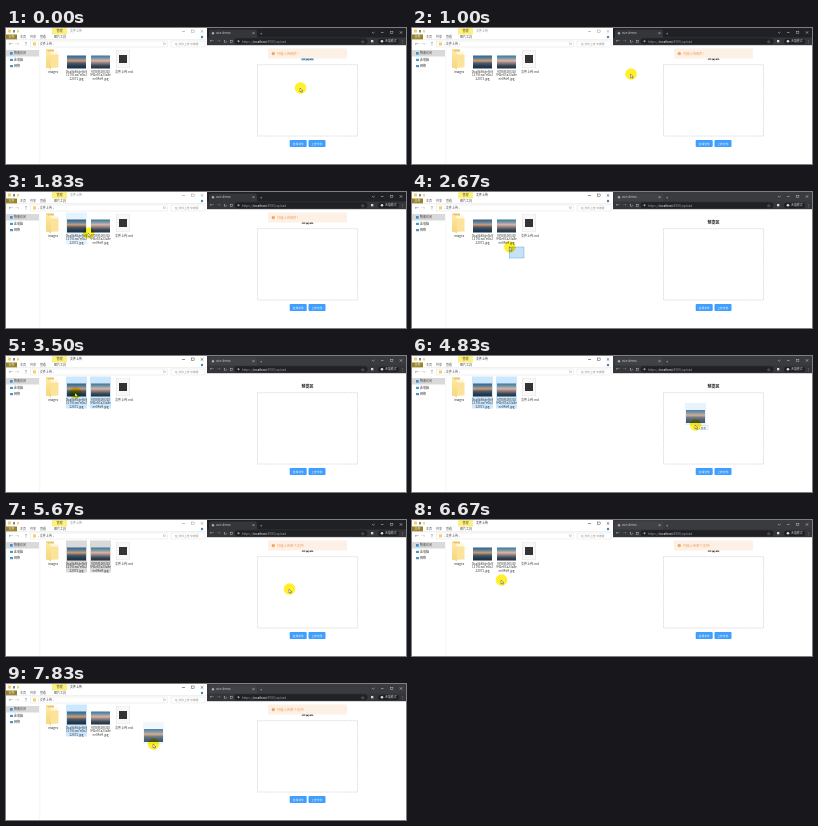
An HTML page with a canvas for the animation above (8000 ms loop, 400 px wide and 136 px high).

```html
<!DOCTYPE html>
<html lang="zh">
<head>
<meta charset="utf-8">
<title>拖拽上传</title>
<style>
html, body { margin: 0; width: 100%; height: 100%; overflow: hidden; background: #fff; }
canvas { display: block; width: 400px; height: 136px; }
</style>
</head>
<body>
<canvas id="stage"></canvas>
<script>
const canvas = document.getElementById('stage');
const g = canvas.getContext('2d');
const ratio = window.devicePixelRatio || 1;
canvas.width = 400 * ratio;
canvas.height = 136 * ratio;

const LOOP = 8000, STEPS = 48;
const FONT = '"Noto Sans CJK SC", "Noto Sans CJK", "Noto Sans", sans-serif';

// Pointer path: step, x, y
const PATH = [
  [0, 294, 60], [2, 285, 57], [5, 235, 48], [7, 202, 44],
  [9, 135, 47], [11, 82, 41], [13, 100, 57], [14, 112, 67],
  [15, 112, 66], [18, 68, 33], [19, 69, 37], [21, 69, 37],
  [24, 145, 46], [27, 256, 63], [29, 283, 69], [35, 283, 69],
  [37, 190, 65], [39, 89, 60], [40, 89, 60], [42, 71, 42],
  [45, 72, 43], [46, 100, 49], [47, 147, 60]
];

function pointer(step) {
  const i = PATH.findIndex(p => p[0] >= step);
  if (i <= 0) return { x: PATH[0][1], y: PATH[0][2] };
  const [a, ax, ay] = PATH[i - 1], [b, bx, by] = PATH[i];
  const u = (step - a) / (b - a);
  return { x: ax + (bx - ax) * u, y: ay + (by - ay) * u };
}

const within = (v, a, b) => v >= a && v < b;

function box(x, y, w, h, color) {
  g.fillStyle = color;
  g.fillRect(x, y, w, h);
}

function round(x, y, w, h, r, color) {
  g.fillStyle = color;
  g.beginPath();
  g.roundRect(x, y, w, h, r);
  g.fill();
}

function disc(x, y, r, color) {
  g.fillStyle = color;
  g.beginPath();
  g.arc(x, y, r, 0, Math.PI * 2);
  g.fill();
}

function line(points, color, width = 0.5) {
  g.strokeStyle = color;
  g.lineWidth = width;
  g.beginPath();
  points.forEach(([x, y], i) => i ? g.lineTo(x, y) : g.moveTo(x, y));
  g.stroke();
}

function frame(x, y, w, h, color, width = 0.5) {
  g.strokeStyle = color;
  g.lineWidth = width;
  g.strokeRect(x, y, w, h);
}

function text(s, x, y, size, color, align = 'left', weight = 400) {
  g.font = `${weight} ${size}px ${FONT}`;
  g.textAlign = align;
  g.textBaseline = 'middle';
  g.fillStyle = color;
  g.fillText(s, x, y);
}

function cross(x, y, r, color) {
  line([[x - r, y - r], [x + r, y + r]], color);
  line([[x + r, y - r], [x - r, y + r]], color);
}

function gradient(y, h, colors) {
  const fill = g.createLinearGradient(0, y, 0, y + h);
  colors.forEach((c, i) => fill.addColorStop(i / (colors.length - 1), c));
  return fill;
}

const SUNSET = ['#31608c', '#58809d', '#d29a70', '#4a5867', '#253c53', '#1d2e40'];
const COAST = ['#3b7595', '#7199aa', '#dfb3a2', '#85797d', '#344655', '#23313f'];

function photo(x, y, colors) {
  box(x, y, 19, 13, gradient(y, 13, colors));
}

function folder(x, y) {
  box(x, y, 8, 18, '#e8c565');
  box(x + 3, y + 2, 9, 16, '#fff7dd');
  g.fillStyle = gradient(y, 20, ['#ffe9a2', '#f7d578']);
  g.beginPath();
  g.moveTo(x, y);
  g.lineTo(x + 5, y + 4);
  g.lineTo(x + 5, y + 20);
  g.lineTo(x, y + 17);
  g.fill();
  box(x + 5, y + 5, 7.5, 13, '#fbe39b');
}

function label(rows, x) {
  rows.forEach((row, i) => text(row, x, 43.5 + i * 3.7, 3.1, '#333', 'center'));
}

function drawExplorer(step, active) {
  const ink = active ? '#222' : '#888';
  box(0, 0, 200, 136, '#fff');

  box(46, 0, 15, 6.5, '#fdf083');
  box(2, 1.5, 3, 3, '#f4cf63');
  box(7, 2, 2, 2.5, '#7d8791');
  box(11, 2, 2, 2.5, '#f1d578');
  text('管理', 53.5, 3.3, 3.1, '#554e20', 'center');
  text('文件上传', 64, 3.3, 3, ink);
  line([[176, 3.5], [179, 3.5]], ink);
  frame(185.5, 2, 2.6, 2.6, ink, 0.4);
  cross(196, 3.4, 1.3, ink);

  box(0, 6.5, 11, 5, '#9a8228');
  text('文件', 5.5, 9, 3, '#fff', 'center');
  text('主页', 17, 9, 3, '#444', 'center');
  text('共享', 27, 9, 3, '#444', 'center');
  text('查看', 37, 9, 3, '#444', 'center');
  text('图片工具', 54, 9, 3, '#444', 'center');
  disc(196, 9, 1.2, '#3c86c7');
  line([[0, 11.7], [200, 11.7]], '#ddd');

  text('←', 3, 16, 4, '#555');
  text('→', 9, 16, 4, '#aaa');
  text('↑', 18, 16, 4, '#555');
  frame(24.5, 13, 137, 6, '#ddd', 0.4);
  box(27, 14.4, 3, 3, '#f4cf63');
  text('› 文件上传 ›', 32, 16, 3.1, '#444');
  text('↻', 157, 16, 3.5, '#777');
  frame(165, 13, 34, 6, '#ddd', 0.4);
  text('在 文件上传 中搜索', 169, 16, 2.8, '#888');

  box(0, 22, 33, 6.5, '#d9d9d9');
  box(4, 24, 2.7, 2.7, '#3c91d4');
  text('快速访问', 8, 25.3, 3, '#333');
  box(4, 30.8, 3, 2.2, '#419bd2');
  text('此电脑', 8, 32, 3, '#333');
  box(4, 37, 3, 2.2, '#4d93bd');
  text('网络', 8, 38.2, 3, '#333');
  line([[33.8, 21], [33.8, 136]], '#eee');

  const both = within(step, 18, 39);
  const mark = active ? '#cce8ff' : '#d9d9d9';
  if (both || step >= 42) box(60, 20.5, 21, 32, mark);
  else if (within(step, 10, 13)) box(60, 20.5, 21, 32, '#e5f3ff');
  if (both || step === 17) box(84, 20.5, 21, 32, mark);

  folder(40, 21.5);
  label(['images'], 47);
  photo(61, 27.5, SUNSET);
  label(['0ba8b86de9b9', '11791ea7e0b2', '22071.jpg'], 70.5);
  photo(85, 27.5, COAST);
  label(['9788f51f0310', '942e87a23a8e', 'ee04d4.jpg'], 94.5);
  box(110, 22, 14, 18, '#e3e3e3');
  box(110.5, 22.3, 13, 17.3, '#f8f8f8');
  box(113, 27, 8, 8, '#333');
  label(['文件上传.md'], 118);
}

function drawMessage(step) {
  const first = step < 14;
  const alpha = step < 13 || step >= 33 ? 1 : step === 13 || step === 32 ? 0.5 : 0;
  if (!alpha) return;
  g.save();
  g.globalAlpha = alpha;
  g.translate(0, (alpha - 1) * 4);
  round(262, 20.5, 79, 10, 1, '#fdf0e4');
  disc(267.3, 25.6, 1.6, '#f09a4b');
  text('!', 267.3, 25.6, 2.6, '#fff', 'center', 700);
  text(first ? '只能上传图片!' : '只能上传单个文件!', 271, 25.6, 3.3, '#ef9b55');
  g.restore();
}

function button(x, s) {
  round(x, 112, 17, 7, 0.8, '#409eff');
  text(s, x + 8.5, 115.5, 2.8, '#fff', 'center');
}

function drawBrowser(step, active) {
  const light = '#d5d6d8';
  box(200, 0, 200, 136, '#fff');
  box(201, 0, 199, 10, active ? '#202124' : '#3a3b3e');
  round(203, 1.5, 48, 9, [2, 2, 0, 0], active ? '#35363a' : '#414246');
  disc(207, 5.2, 1.2, '#a9adb2');
  text('vue-demo', 210, 5.3, 3.1, light);
  cross(247.5, 5.2, 0.9, light);
  text('+', 255, 5.2, 4, light, 'center');
  line([[366, 4], [367.3, 5.2], [368.6, 4]], light);
  line([[375, 4.5], [377.5, 4.5]], light);
  frame(384.5, 3.3, 2.4, 2.4, light, 0.4);
  cross(395, 4.5, 1.2, light);

  box(201, 9.5, 199, 7.7, '#35363a');
  round(228.5, 10.3, 133, 6, 3, '#202124');
  text('←', 204, 13.2, 4, light);
  text('→', 210.5, 13.2, 4, '#85878a');
  text('↻', 217.5, 13.2, 4, light);
  frame(224.2, 12.3, 2.2, 2.2, light, 0.4);
  disc(232.5, 13.3, 1, '#a4a7ab');
  text('https://', 236, 13.3, 3.2, '#9aa0a6');
  const start = 236 + g.measureText('https://').width;
  text('localhost', start, 13.3, 3.2, '#fff');
  const rest = start + g.measureText('localhost').width;
  text(':8080/upload', rest, 13.3, 3.2, '#9aa0a6');
  text('☆', 355, 13.3, 3.5, light);
  box(365, 12, 2.3, 2.3, light);
  round(372, 10.7, 21, 5.3, 2.6, '#202124');
  disc(376, 13.3, 1.3, light);
  text('无痕模式', 379, 13.3, 2.9, light);
  text('⋮', 396.5, 13.3, 4, light, 'center');

  if (step < 3) box(295, 27.5, 13, 5, '#a9d3f5');
  text('预览区', 301.5, 30, 4, step < 3 ? '#174f83' : '#111', 'center', 700);
  drawMessage(step);

  g.setLineDash([1, 0.7]);
  frame(251.5, 36.7, 100, 71.3, '#b4b4b4', 0.5);
  g.setLineDash([]);
  button(283.7, '选择文件');
  button(302.5, '上传文件');
}

function drawPointer(step) {
  const { x, y } = pointer(step);

  if (within(step, 16, 19)) {
    box(x, y, 112 - x, 66 - y, 'rgba(0,120,215,.22)');
    frame(x, y, 112 - x, 66 - y, '#4b9ddd', 0.4);
  }

  const pair = within(step, 22, 31);
  if (pair || step >= 46) {
    g.save();
    g.globalAlpha = 0.8;
    box(x - 10, y - 22, 21, 22, pair ? '#e3f1fc' : '#eef6fc');
    photo(x - 9, y - 15, SUNSET);
    g.restore();
    if (pair && x > 201) {
      box(x + 2, y + 0.8, 11, 4, '#fff');
      frame(x + 2, y + 0.8, 11, 4, '#aaa', 0.3);
      text('+ 复制', x + 7.5, y + 2.9, 2.7, '#2868a0', 'center');
    }
  }

  g.globalCompositeOperation = 'multiply';
  disc(x + 0.5, y, 5.8, '#fff02a');
  g.globalCompositeOperation = 'source-over';

  g.fillStyle = '#fff';
  g.strokeStyle = '#333';
  g.lineWidth = 0.4;
  g.beginPath();
  [[0, 0], [0, 4], [1, 3.1], [1.7, 4.5], [2.3, 4.2], [1.6, 2.8], [2.9, 2.8]]
    .forEach(([dx, dy]) => g.lineTo(x + dx, y + dy));
  g.closePath();
  g.fill();
  g.stroke();
}

function draw(time) {
  const step = Math.floor((time % LOOP) * STEPS / LOOP + 0.05) % STEPS;
  const explorerActive = within(step, 15, 31) || step >= 39;
  g.setTransform(ratio, 0, 0, ratio, 0, 0);
  drawExplorer(step, explorerActive);
  drawBrowser(step, !explorerActive);
  drawPointer(step);
}

const begin = performance.now();
function tick() {
  draw(performance.now() - begin);
  requestAnimationFrame(tick);
}
tick();
</script>
</body>
</html>
```
